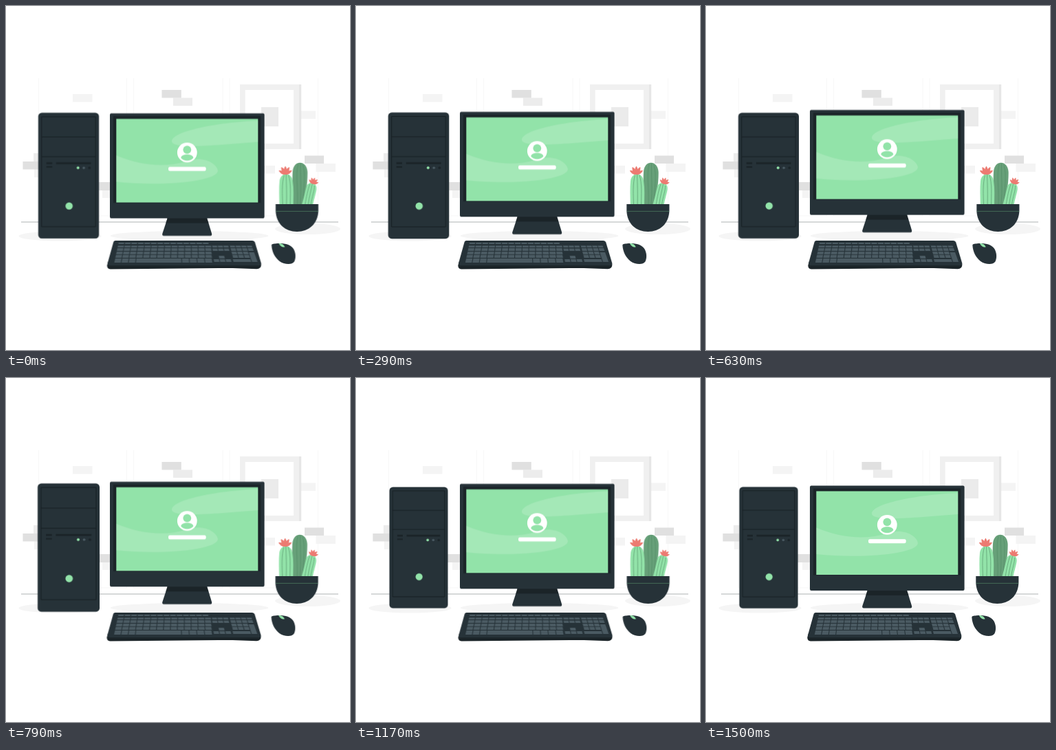
An HTML page for the animation above (1540 ms loop, 500 px wide and 500 px high).

```html
<!DOCTYPE html>
<html lang="en">
<head>
<meta charset="utf-8">
<title>Desktop computer</title>
<style>
  html, body { margin: 0; width: 100%; height: 100%; overflow: hidden; background: #fff; }
  svg { display: block; width: 100vw; height: 100vh; }
  .body { fill: #263238; }
  .dark { fill: #1b2428; }
  .green { fill: #92e3a9; }
  .key { fill: #4a5a62; }
  .line { fill: none; stroke: #182024; stroke-width: .9; }
  .vein { fill: none; stroke: #4f8a64; stroke-width: .6; }
  .flower { fill: #ec7b72; }

  #tower, #monitor, #desk { animation: 1540ms linear -42ms infinite; }
  #tower { transform-box: view-box; transform-origin: 91px 246.5px; animation-name: beat; }
  #monitor { animation-name: float; }
  #desk { animation-name: shake; }

  @keyframes beat {
    0%, 30%, 40%, 60%, 100% { transform: scale(1); }
    10%, 50% { transform: scale(1.1); }
  }
  @keyframes float {
    0%, 100% { transform: translateY(0); }
    50% { transform: translateY(-6.2px); }
  }
  @keyframes shake {
    0%, 100% { transform: translateX(0); }
    10%, 90% { transform: translateX(-1px); }
    20%, 80% { transform: translateX(2px); }
    30%, 50%, 70% { transform: translateX(-4px); }
    40%, 60% { transform: translateX(4px); }
  }
</style>
</head>
<body>
<svg viewBox="0 0 500 500">
  <defs>
    <path id="petal" d="M0 0C-3.6-4-2.4-9 0-12.5C2.4-9 3.6-4 0 0Z"/>
    <g id="bloom" class="flower">
      <use href="#petal" transform="rotate(-58) scale(.9)"/>
      <use href="#petal" transform="rotate(-28)"/>
      <use href="#petal"/>
      <use href="#petal" transform="rotate(28)"/>
      <use href="#petal" transform="rotate(58) scale(.9)"/>
    </g>
  </defs>

  <g id="wall">
    <path d="M47.5 105V305M175.5 105V305M185.5 105V305M315 105V305M325 105V305M453.5 105V305M47.5 305H175.5M185.5 305H315M325 305H453.5"
          fill="none" stroke="#f7f7f7"/>
    <g fill="#f4f4f4">
      <path d="M97 128h28.5v11.5H97zM41 237h28v12H41zM140 268h28v11H140zM450.5 229h28.5v12h-28.5zM422 152.5h28v11.5h-28zM363 232h28v11.5h-28z"/>
    </g>
    <path d="M243 133.5h28v11.5h-28zM40 214h28v12H40z" fill="#ececec"/>
    <path d="M226.5 122h28.3v11.5h-28.3zM24.5 226h28v11.5h-28zM126 256h28v12h-28zM434 217.5h28v11.5h-28z" fill="#e0e0e0"/>
    <path d="M340 114h86.5v94H340z" fill="#f0f0f0"/>
    <path d="M426 114h3.2v94H426z" fill="#e6e6e6"/>
    <path d="M347.7 122h70.3v78h-70.3z" fill="#fff"/>
    <path d="M371 147h25v28h-25z" fill="#ebebeb"/>
  </g>

  <path d="M22 314H483" stroke="#aeb2b4" stroke-width="1.2"/>
  <g fill="#f5f5f5">
    <ellipse cx="78.5" cy="334.5" rx="60" ry="7"/>
    <ellipse cx="266.5" cy="334" rx="115" ry="7"/>
    <ellipse cx="438.5" cy="324" rx="47.5" ry="8"/>
  </g>

  <g id="tower">
    <rect class="body" x="48.5" y="158.5" width="85" height="176" rx="5"/>
    <path class="line" d="M53.2 318V164H128.8V318ZM53.2 192.3H128.8M53.2 220H128.8"/>
    <path class="dark" d="M60 227.8h8v2.6h-8zM60 233.2h8v2.2h-8zM73.5 227.8h48.7v2.8H73.5z"/>
    <circle class="green" cx="104.2" cy="235.6" r="1.9"/>
    <circle class="key" cx="112.3" cy="235.6" r="1.8"/>
    <circle class="dark" cx="120.2" cy="235.6" r="1.8"/>
    <circle class="green" cx="91.7" cy="289" r="5.1"/>
  </g>

  <g id="monitor">
    <path class="body" d="M235 308H292L299 331Q300 334.4 297 334.4H229.5Q226.3 334.4 227.4 331Z"/>
    <path class="dark" d="M235 308H291.5L294.3 316H232.4Z"/>
    <rect class="body" x="151" y="156.4" width="224.6" height="152.6" rx="2"/>
    <path class="dark" d="M156 160.4H370.3V286.4H156Z"/>
    <path class="green" d="M160.3 164.4H366.3V286.1H160.3Z"/>
    <g fill="#fff">
      <path opacity=".16" d="M366.3 167C315 169 242 181 241 197C241 210 310 202 366.3 198Z"/>
      <path opacity=".16" d="M160.3 217.5C195 232 230 236 262 226C288 217 307 230 308 240C307 256 225 263 160.3 256Z"/>
      <circle cx="263.3" cy="213.4" r="14.4"/>
      <rect x="236" y="234.2" width="54.7" height="6" rx="2.2"/>
    </g>
    <circle class="green" cx="263.3" cy="209.3" r="5.9"/>
    <path class="green" d="M254.3 221.2C254.3 214.6 272.3 214.6 272.3 221.2C268 226.6 258.5 226.6 254.3 221.2Z"/>
  </g>

  <g id="desk">
    <path class="dark" d="M149 371L147.3 377Q147.2 382.3 152 382.4L310 381L330 381L365 382.2Q371 382 371.4 376L369 371Z"/>
    <path class="body" d="M159.5 341H358.5Q361.4 341 362.2 343.5L371.3 374Q371.6 377.3 368 377.3H151Q147.2 377 148 374L156.6 343Q157.2 341 159.5 341Z"/>
    <g id="keys" class="key"></g>

    <path class="body" d="M386.4 348.5C386 345.5 389 345.6 393 345.2C404 344.4 414 346 418.6 353.5C422 360 421.6 367 419.4 371.5C416 377 404 375.5 398 371C391 365.5 387 357 386.4 348.5Z"/>
    <path class="green" d="M397 345.2C400.5 344.6 404.5 347 405.6 350.4C402.4 351.4 398.4 348.6 397 345.2Z"/>

    <path fill="#67a079" d="M416.8 290C417.8 270 416 255 417 241C418 223 437.6 223.5 438.6 241C439 256 435.5 275 434.8 290Z"/>
    <path class="vein" d="M424 289C425 265 421 245 425 230M428 289C430 265 428 245 428.5 229M432 289C433 265 436 245 432 231"/>
    <path class="green" d="M430 290C433.5 278 435 270 436.8 263C439.5 253.5 453.5 255.5 451.6 267C450 276 447.5 282 446.5 290Z"/>
    <path class="vein" d="M435 289C437 277 439 267 442 259M439.5 289C441 277 444 267 445.5 258.5M443.5 289C445 277 449 268 448.6 261"/>
    <path class="green" d="M397.8 290C397.5 276 397 264 398 254C400 241 415 241 417 254C419 266 418 278 418 290Z"/>
    <path class="vein" d="M402.5 289C402 275 401 258 404.5 246M408 289C408.6 275 408 258 407.5 245M413.5 289C413.5 275 415 258 411 246"/>
    <use href="#bloom" transform="translate(406.4 245)"/>
    <use href="#bloom" transform="translate(446.4 258.6) rotate(17) scale(.76)"/>
    <path class="body" d="M392.3 288H454.4V297C454 317 440 328 423.3 328C406.5 328 392.7 317 392.3 297Z"/>
    <path d="M392.4 298.4H454.3" stroke="#4c7a60" stroke-width=".8"/>
  </g>
</svg>
<script>
  const keys = document.getElementById('keys');
  // Keys widen and lean outwards towards the front edge.
  const px = (u, y) => (235.3 + u * (1 + (y - 345) * .003)).toFixed(2);
  let d = '';

  function key(u, w, y, h) {
    const b = y + h;
    d += `M${px(u, y)} ${y}L${px(u + w, y)} ${y}L${px(u + w, b)} ${b}L${px(u, b)} ${b}Z`;
  }
  function row(u, end, n, y, h, gap = 1) {
    const step = (end - u + gap) / n;
    for (let i = 0; i < n; i++) key(u + i * step, step - gap, y, h);
  }

  row(-71.5, 59.5, 14, 344, 2, 1.2);
  const rows = [[348.3, 2.7], [352.1, 4], [357, 4], [361.8, 4.3]];
  rows.forEach(([y, h], i) => {
    row(-71.5, 62.5 - i * .6, 14, y, h);
    row(89.5, i < 2 ? 121 : 112.5, i < 2 ? 4 : 3, y, h);
  });

  row(-71.5, -43.5, 3, 367, 6);
  key(-42.5, 61, 367, 6);
  row(19.5, 60, 4, 367, 6);

  row(64, 87.3, 3, 348.3, 2.7);
  row(63.5, 87, 3, 352.6, 3.4);
  key(70.5, 7.5, 363, 4);
  row(62.5, 86, 3, 368, 4);
  key(88.5, 24, 368, 4);
  key(113.5, 7.5, 358, 14);

  keys.innerHTML = `<path d="${d}"/>`;
</script>
</body>
</html>
```
